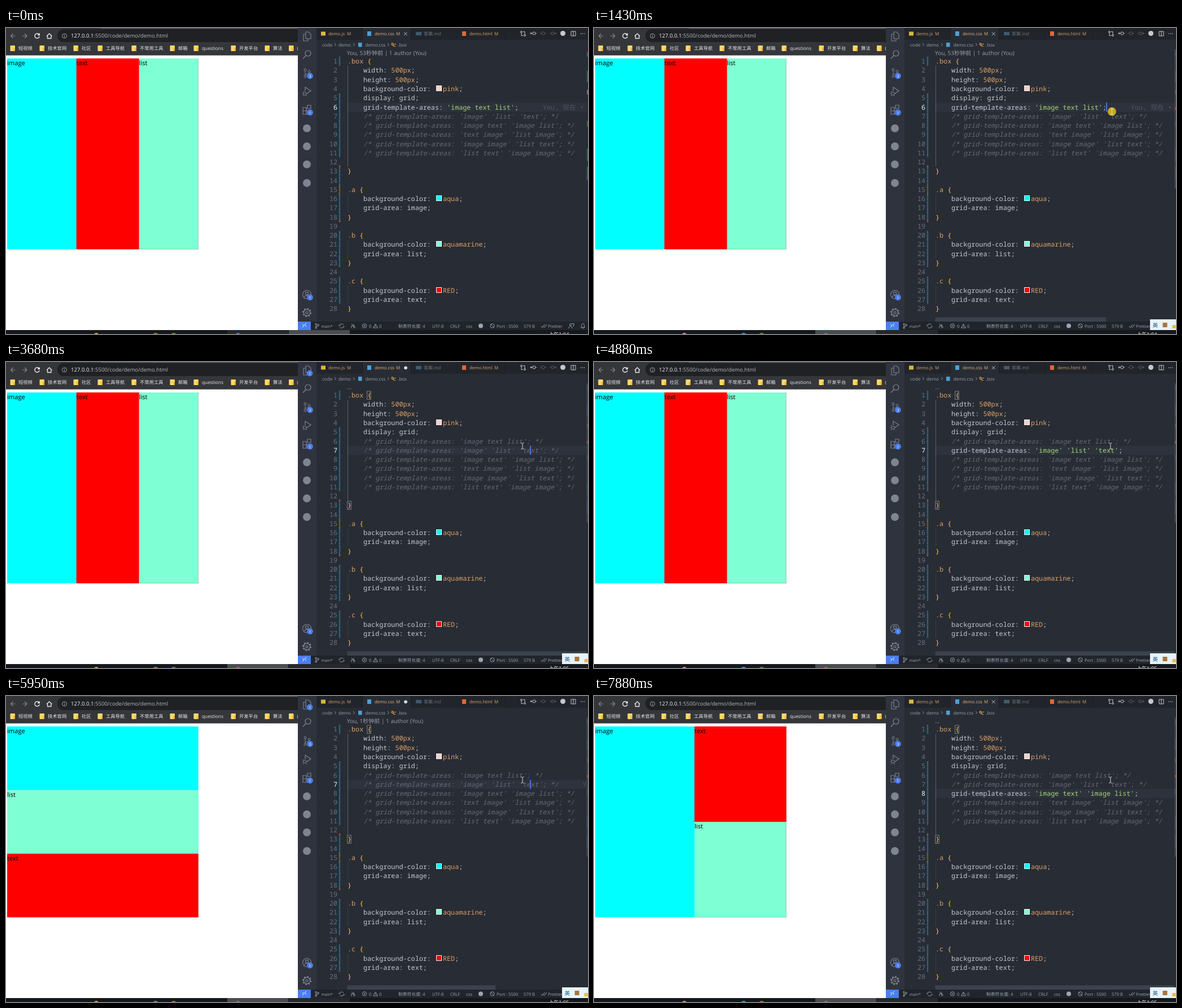
These frames come from a looping animation (1031x543 px, 8 s). An HTML page:

```html
<!DOCTYPE html>
<html lang="zh">
<head>
<meta charset="utf-8">
<title>Grid areas demo</title>
<style>
html, body { margin: 0; width: 100%; height: 100%; overflow: hidden; background: #fff; }
svg { display: block; }
text { white-space: pre; font-family: "Open Sans", "Noto Sans CJK SC", sans-serif; text-rendering: geometricPrecision; }
.code { font-family: "Noto Sans Mono", "Noto Sans CJK SC", monospace; font-size: 11.75px; }
.note { font-style: italic; }
</style>
</head>
<body>
<svg id="stage" width="1031" height="543" viewBox="0 0 1031 543"></svg>
<script>
const LOOP = 8000, ROW = 16.26;
const GREY = '#c3c8d1', ORANGE = '#d9a06a', GREEN = '#a5d27c', YELLOW = '#ffd70a',
      DIM = '#636a76', ICON = '#7d8492', BLUE = '#4a7ff0';

const rect = (x, y, w, h, fill, more = '') =>
  `<rect x="${x}" y="${y}" width="${w}" height="${h}" fill="${fill}" ${more}/>`;
const disc = (x, y, r, fill) => `<circle cx="${x}" cy="${y}" r="${r}" fill="${fill}"/>`;
const ring = (x, y, r, color, w = 1) =>
  `<circle cx="${x}" cy="${y}" r="${r}" fill="none" stroke="${color}" stroke-width="${w}"/>`;
const path = (d, color, w = 1, more = '') =>
  `<path d="${d}" fill="none" stroke="${color}" stroke-width="${w}" ${more}/>`;
const label = (x, y, s, fill, size, more = '') =>
  `<text x="${x}" y="${y}" fill="${fill}" font-size="${size}" ${more}>${s}</text>`;
const at = (x, y, body) => `<g transform="translate(${x} ${y})">${body}</g>`;
// Shows the body only inside the given "from-to" spans (ms).
const on = (spans, body) => `<g data-on="${spans}">${body}</g>`;

const mid = n => 59 + ROW * (n - 1);
const span = (color, s) => `<tspan fill="${color}">${s}</tspan>`;
const code = (n, x, body, cls = '') =>
  `<text class="code ${cls}" x="${x}" y="${mid(n) + 4.2}">${body}</text>`;

/* ---------- browser ---------- */
function browser() {
  let s = rect(0, 0, 517, 543, '#fff') + rect(0, 0, 517, 48.6, '#35363a') +
    rect(91, 2, 450, 23, '#202124', 'rx="11.5"') + rect(168, 0, 349, 1, '#5f6368');
  s += path('M16.5 14h-8m4 -4l-4 4l4 4', '#85878b', 1.2) +
    path('M29 14h8m-4 -4l4 4l-4 4', '#85878b', 1.2) +
    path('M58.5 11.5a4.2 4.2 0 1 0 .7 3.5M59.3 9.5v3h-3', '#e8eaed', 1.4) +
    path('M72 14.5l4.7 -4.5l4.7 4.5M73.5 13.5v5h6.4v-5', '#e8eaed', 1.3);
  s += ring(103.5, 14, 4, '#9aa0a6') + path('M103.5 13.5v3M103.5 11.5v1', '#9aa0a6');
  s += label(115, 17.4, '127.0.0.1' + span('#b4b7bc', ':5500/code/demo/demo.html'), '#f1f3f4', 9.57);
  const marks = [[22, '短视频'], [74, '技术官网'], [134, '社区'], [177, '工具导航'], [237, '不常用工具'],
    [305, '邮箱'], [347, 'questions'], [413, '开发平台'], [473, '算法'], [515.5, '(']];
  for (const [x, name] of marks)
    s += rect(x - 14.5, 31, 8.5, 10, '#ffd968', 'rx="1"') + rect(x - 9, 35, 3, 6, '#f0b93a') +
      label(x, 39.4, name, '#e8eaed', 8.3);
  return s;
}

const AQUA = '#00ffff', MARINE = '#7fffd4', RED = '#ff0000';
const LEFT = 2, TOP = 54, RIGHT = 340.8, BOTTOM = 392.7;
const box = (x, y, fill, name) =>
  rect(x, y, RIGHT - x, BOTTOM - y, fill) + label(x, y + 12, name, '#000', 11.2);
// Each later box covers the rest of the grid to its right and below.
function page() {
  const image = box(LEFT, TOP, AQUA, 'image'), third = (BOTTOM - TOP) / 3;
  return on('0-5020', image + box(124.7, TOP, RED, 'text') + box(235.6, TOP, MARINE, 'list')) +
    on('5020-7880', image + box(LEFT, TOP + third, MARINE, 'list') + box(LEFT, TOP + 2 * third, RED, 'text')) +
    on('7880-8000', image + box(178, TOP, RED, 'text') + box(178, TOP + 1.5 * third, MARINE, 'list'));
}

/* ---------- editor frame ---------- */
const DIRTY = '2620-4810 5950-7750';
const badge = (x, y, s) => disc(x, y, 5.4, BLUE) + label(x, y + 2.5, s, '#fff', 6.5, 'text-anchor="middle"');

function sidebar() {
  const files = path('M-2 -8h5l4 4v8h-9zM-2 -4h-4v12h8v-4', ICON, 1.1);
  const search = ring(2, -2, 5, ICON, 1.2) + path('M-1.5 1.5l-5.5 6', ICON, 1.3);
  const scm = ring(-3, -6, 2, ICON) + ring(-3, 6, 2, ICON) + ring(4, -3, 2, ICON) +
    path('M-3 -4v8M4 -1c0 4 -7 1 -7 4', ICON);
  const debug = path('M-3 -1v-7l10 6.5l-8 5.5', ICON, 1.2) + ring(-3.5, 3.5, 2.7, ICON) +
    path('M-8 3.5h2M-1 3.5h2M-7 8l2 -2M0 8l-2 -2M-7 0l2 1', ICON);
  const blocks = path('M-7 -4h6v12h-6zM-7 2h12v6h-12M1 -8h6v6h-6z', ICON, 1.2);
  const user = ring(0, 0, 7.5, ICON, 1.1) + ring(0, -2, 2.6, ICON, 1.1) + path('M-5 5.5c1 -5 9 -5 10 0', ICON, 1.1);
  const gear = ring(0, 0, 5.6, ICON, 1.2) + ring(0, 0, 2, ICON, 1.1) +
    `<circle r="7" fill="none" stroke="${ICON}" stroke-width="2" stroke-dasharray="2.75"/>`;
  const icons = [[15, files], [47, search], [80, scm], [113, debug], [145, blocks], [473, user], [505, gear]];
  return rect(517, 0, 33, 521, '#2f333d') +
    icons.map(([y, body]) => at(533, y, body)).join('') +
    [178, 210, 242, 275].map(y => disc(533, y, 7, ICON)).join('') +
    on(DIRTY, badge(538, 20, '1')) +
    on('0-6280 6490-8000', badge(538.5, 85, '3')) +
    on('6280-6490', disc(538.5, 85, 5.4, BLUE) + path('M538.5 82v3h2.5', '#fff')) +
    badge(538.5, 150, '1') + badge(538.5, 478, '1');
}

function tabs() {
  const M = (x, c) => label(x, 13, 'M', c, 7.9);
  let s = rect(550, 0, 481, 21, '#21252b') + rect(632, 0, 85, 21, '#282c34');
  for (const x of [631, 717, 799, 884]) s += rect(x, 0, 1, 21, '#1b1e23');
  s += rect(558, 6.5, 8, 7, '#d9b83f') + rect(640, 6, 7, 8, '#4f9fd6') +
    rect(726, 7, 10, 6, '#3f5a70') + rect(808, 6, 7, 8, '#e06a35');
  s += label(571, 13, 'demo.js', ORANGE, 7.9) + M(604, ORANGE) +
    label(653, 13, 'demo.css', '#e3b27c', 7.9) + M(691, '#e3b27c') +
    label(740, 13, '答案.md', '#6d7482', 8) +
    label(821, 13, 'demo.html', ORANGE, 7.9) + M(865, ORANGE);
  s += on('0-2620 4810-5950 7750-8000', path('M705 7.5l5.5 5.5m0 -5.5l-5.5 5.5', '#c0c5ce')) +
    on(DIRTY, disc(708, 10.3, 2.9, '#d7dae0'));
  const c = '#c3c8d1', d = '#555b67';
  s += ring(913, 7, 1.5, c) + ring(919, 13, 1.5, c) + path('M913 9v4.5h3M919 11v-4.5h-3', c) +
    ring(935.5, 9.5, 2.5, c) + path('M933 9.5h-4l2 -2m-2 2l2 2M938 9.5h2', c) +
    ring(951.5, 9.5, 2.7, d) + path('M946 9.5h3M954 9.5h3', d) +
    ring(968, 9.5, 2.5, d) + path('M970.5 9.5h4l-2 -2m2 2l-2 2M965.5 9.5h-2', d) +
    disc(986.5, 9.5, 4.5, c) + path('M1001 6h8v8h-8zM1005 6v8', c) +
    [1018.5, 1021.5, 1024.5].map(x => disc(x, 10, .8, c)).join('');
  return s;
}

function crumbs() {
  const c = '#979eab';
  let s = label(560, 32.5, 'code', c, 8.1) + label(589, 32.5, 'demo', c, 8.1) +
    label(636.5, 32.5, 'demo.css', c, 8.1) + label(694, 32.5, '.box', c, 8.1);
  for (const x of [582, 615, 676]) s += path(`M${x} 27l2.5 2.5l-2.5 2.5`, c, .9);
  return s + rect(624, 26, 6.5, 7.5, '#4f9fd6') +
    path('M684 26.5l3 2l-2 2.5l-2 -2zM687 30v2.5h3M688 28.5h3', '#e0a050', 1.1);
}

function status() {
  const c = '#9da5b4', put = (x, s, size = 7.6) => label(x, 531.5, s, c, size);
  let s = rect(517, 521, 514, 15, '#21252b') + rect(517, 521, 23, 15, BLUE) +
    path('M525 525.5l3 2.8l-3 2.8M532 524l-3 2.8l3 2.8', '#fff');
  s += ring(549, 525.5, 1.3, c, .9) + ring(549, 532, 1.3, c, .9) + ring(553, 527, 1.3, c, .9) +
    path('M549 527v3.5c0 -2 4 0 4 -2', c, .9);
  s += path('M590.5 528a4 3.5 0 0 1 7.5 -1M598.5 529.5a4 3.5 0 0 1 -7.5 1M589 527.5l1.5 1.5l1.5 -1.5M597 530.5l1.5 -1.5l1.5 1.5', c, .9) +
    path('M612 525l4 3.5h-4v4M616 528.5l2.5 2l-2.5 2v-7', c, .9);
  s += ring(635, 528.5, 3.7, c, .9) + path('M633.5 527l3 3m0 -3l-3 3', c, .9) +
    path('M650.5 532l4 -7l4 7zM654.5 527.5v2.5', c, .9);
  s += put(558.5, 'main*', 7) + put(643, '0') + put(661, '0') + put(695, '制表符长度: 4', 7.8) + put(755, 'UTF-8') +
    put(787, 'CRLF') + put(815, 'css') + put(869, 'Port : 5500') + put(917, '579 B') + put(960, 'Prettier', 7.4);
  s += disc(841, 528.5, 4, c) + ring(861.5, 528.5, 3.7, c, .9) + path('M859 526l5 5', c, .9) +
    path('M948 529l2 2.5l4.5 -5.5M952.5 530.5l1 1l4.5 -5.5', c) +
    ring(1000, 526.5, 1.7, c, .9) + path('M997 533c0 -5 6 -5 6 0M1002 524.5h4v4l-2 1', c, .9) +
    path('M1018.5 531.5c2 -1 0 -7 3.5 -7s1.5 6 3.5 7zM1021 533h2', c, .9);
  return s;
}

function taskbar() {
  const clock = s => label(961, 546.5, '上午1:' + s, '#fff', 9.2);
  // The lit button follows the focused window.
  const lit = (x, spans) => rect(x, 536, 108, 7, '#25282c') + on(spans, rect(x, 536, 108, 7, '#4a4c4f'));
  return rect(0, 536, 1031, 7, '#15181c') + lit(392, '1430-8000') + lit(501, '0-1430') +
    disc(160, 545, 4, '#d8b12c') + disc(265, 547, 6, '#2f9be0') +
    disc(297, 547, 6, '#d9562c') + disc(411, 545, 4, '#2f8fd0') +
    on('0-1500', clock('04')) + on('1500-8000', clock('05'));
}

const inputBar = () => on('70-8000',
  rect(985, 517, 46, 19, '#e6f4fb') +
  label(989.5, 531, '英', '#1d4f86', 9.5) + rect(1007.5, 523, 8, 8, '#a8743a') +
  rect(1024.5, 527, 6, 6, '#f0bb2c'));

/* ---------- code ---------- */
const AREAS = ["'image text list'", "'image' 'list' 'text'", "'image text' 'image list'",
  "'text image' 'list image'", "'image image' 'list text'", "'list text' 'image image'"];
const IN = 633;

const rule = (n, name) => code(n, 605, span(ORANGE, name) + span(YELLOW, ' {'));
const prop = (n, key, value, color = GREY) =>
  code(n, IN, span(GREY, key + ': ') + span(color, value) + span(GREY, ';'));
const swatch = (n, fill, name) =>
  code(n, IN, span(GREY, 'background-color:')) +
  rect(762.5, Math.round(mid(n)) - 5.5, 9, 9, fill, 'stroke="#f4f4f4"') +
  code(n, 774, span(ORANGE, name) + span(GREY, ';'));
const close = n => code(n, 605, span(YELLOW, '}'));

function areaLine(i, live, muted) {
  const n = 6 + i;
  return on(muted, code(n, IN, span(DIM, `/* grid-template-areas: ${AREAS[i]}; */`), 'note')) +
    on(live, prop(n, 'grid-template-areas', AREAS[i], GREEN));
}

const ACTIVE = { 6: '0-3610', 7: '3610-6490', 8: '6490-8000' };

function gutter() {
  let s = '';
  for (let n = 1; n <= 28; n++) {
    const num = c => `<text class="code" x="587" y="${mid(n) + 4.2}" text-anchor="end" fill="${c}">${n}</text>`;
    s += num('#667085');
    if (ACTIVE[n]) s += on(ACTIVE[n], num('#dfe3ea'));
  }
  const bar = (a, b, c = '#2b7d9c') => path(`M591 ${mid(a) - 8}V${mid(b) + 8}`, c, 2.4, 'stroke-dasharray="1.6 .8"');
  s += bar(1, 1) + bar(5, 11) + bar(13, 14) + bar(15, 15, '#7d7a2c') + bar(16, 18) + bar(20, 23) + bar(25, 27);
  for (const n of [12, 18]) s += `<path d="M590 ${mid(n) + 5}l3 2.5l-3 2.5z" fill="#b8452f"/>`;
  return s;
}

function caret() {
  const bar = (n, x, spans) => on(spans, rect(x - .7, mid(n) - 8, 1.5, 16.2, '#528bff'));
  return bar(6, 908, '1430-1960 2420-2620') + bar(6, 929, '2620-3090') +
    bar(7, 929, '3610-4210 5950-6490') + bar(7, 908, '4350-4810 5350-5680') +
    bar(8, 929, '6560-7150') + bar(8, 908, '7150-7750');
}

function lens() {
  const row = (spans, s) => on(spans, label(604, 48.3, s, '#9aa0ab', 10.05));
  const who = when => `You, ${when} | 1 author (You)`;
  return row('0-1960', who('53秒钟前')) + row('1960-3090', who('1分钟前')) +
    row('5350-6490', who('1秒钟前')) + row('3090-5350 6490-8000', '...');
}

function blame() {
  const row = (n, x, spans, when) =>
    on(spans, code(n, x, span('#4d5463', `You, ${when} • Uncommitted changes`)));
  return `<g clip-path="url(#pane)">` + row(6, 951, '0-2620', '现在') +
    row(7, 978, '5420-5950', '1秒钟前') + row(7, 1021, '5950-6010', '1秒钟前') + '</g>';
}

function scrollbars() {
  const bar = (end, spans) => on(spans, rect(604.5, 513.5, end - 604.5, 7.5, '#3c424d'));
  let s = bar(907, '540-2620') + bar(1028, '2620-5680 6010-8000') + bar(884, '5680-5950') + bar(867, '5950-6010');
  for (const [y, h] of [[43, 8], [76, 20], [165, 10], [214, 22], [246, 24]])
    s += rect(1029, y, 2, h, '#1f6a88');
  return s + rect(1029, 110, 2, 8, '#7d7a2c') + on('540-8000', rect(1028.5, 38, 2.5, 247, '#4a505c', 'opacity=".75"')) +
    on('1430-8000', rect(1029, 140, 2, 5, '#b8452f'));
}

function editor() {
  let s = rect(550, 21, 481, 500, '#282c34');
  for (const n in ACTIVE) s += on(ACTIVE[n], rect(604, mid(n) - 8, 425, 16.2, '#2d323c'));
  const guide = (a, b, c) => path(`M605.5 ${mid(a) - 8}V${mid(b) + 8}`, c);
  s += guide(2, 12, '#596070') + guide(16, 17, '#3b4048') + guide(21, 22, '#3b4048') + guide(26, 27, '#3b4048');
  const frame = 'stroke="#858b98" stroke-width=".9"';
  s += on('1500-8000', rect(639.7, 52, 6.5, 14.5, 'none', frame) + rect(604.7, 247, 6.5, 14.5, 'none', frame));
  s += gutter() + lens() + rule(1, '.box') + prop(2, 'width', '500px', ORANGE) + prop(3, 'height', '500px', ORANGE) +
    swatch(4, '#f6cfc8', 'pink') + prop(5, 'display', 'grid');
  s += areaLine(0, '0-2620', '2620-8000') + areaLine(1, '4350-5950', '0-4350 5950-8000') +
    areaLine(2, '7150-8000', '0-7150');
  for (const i of [3, 4, 5]) s += areaLine(i, '', '0-8000');
  s += close(13);
  const blocks = [[15, '.a', AQUA, 'aqua', 'image'], [20, '.b', MARINE, 'aquamarine', 'list'], [25, '.c', RED, 'RED', 'text']];
  for (const [n, name, fill, color, area] of blocks)
    s += rule(n, name) + swatch(n + 1, fill, color) + prop(n + 2, 'grid-area', area) + close(n + 3);
  return s + blame() + scrollbars() + caret();
}

/* ---------- mouse ---------- */
const pointer = () => `<g id="mouse">` +
  on('1430-1690', disc(0, 0, 7.5, '#c4ae1c')) +
  path('M-2.5 -5.5q2 0 2.5 1.2q.5 -1.2 2.5 -1.2M0 -4.5v9M-2.5 5.5q2 0 2.5 -1.2q.5 1.2 2.5 1.2', '#e8e8e8', .9) + '</g>';
const TRACK = [[260, 1010, 536], [500, 982, 457], [650, 953, 385], [1030, 918, 147],
  [1160, 917.5, 149], [1430, 917.5, 148], [1500, 915, 149]];

// The pointer moves in 70 ms hops along the track.
function mouseAt(t) {
  const q = 260 + Math.floor((t - 260) / 70) * 70;
  let i = 0;
  while (i < TRACK.length - 2 && TRACK[i + 1][0] <= q) i++;
  const [t0, x0, y0] = TRACK[i], [t1, x1, y1] = TRACK[i + 1];
  const k = Math.min(1, Math.max(0, (q - t0) / (t1 - t0)));
  return [x0 + (x1 - x0) * k, y0 + (y1 - y0) * k];
}

const stage = document.getElementById('stage');
stage.innerHTML = `<clipPath id="pane">${rect(604, 38, 425, 483, '#000')}</clipPath>` +
  browser() + page() + editor() + sidebar() + tabs() + crumbs() + status() + taskbar() + inputBar() + pointer();

const timed = [...stage.querySelectorAll('[data-on]')].map(el => ({
  el, spans: el.dataset.on.split(' ').map(s => s.split('-').map(Number))
}));
const mouse = document.getElementById('mouse');
const start = performance.now();

function draw(now) {
  const t = Math.max(0, now - start) % LOOP;
  for (const { el, spans } of timed)
    el.style.display = spans.some(([a, b]) => t >= a && t < b) ? '' : 'none';
  mouse.style.display = t < 260 ? 'none' : '';
  mouse.setAttribute('transform', `translate(${mouseAt(t)})`);
  requestAnimationFrame(draw);
}
draw(start);
</script>
</body>
</html>
```
